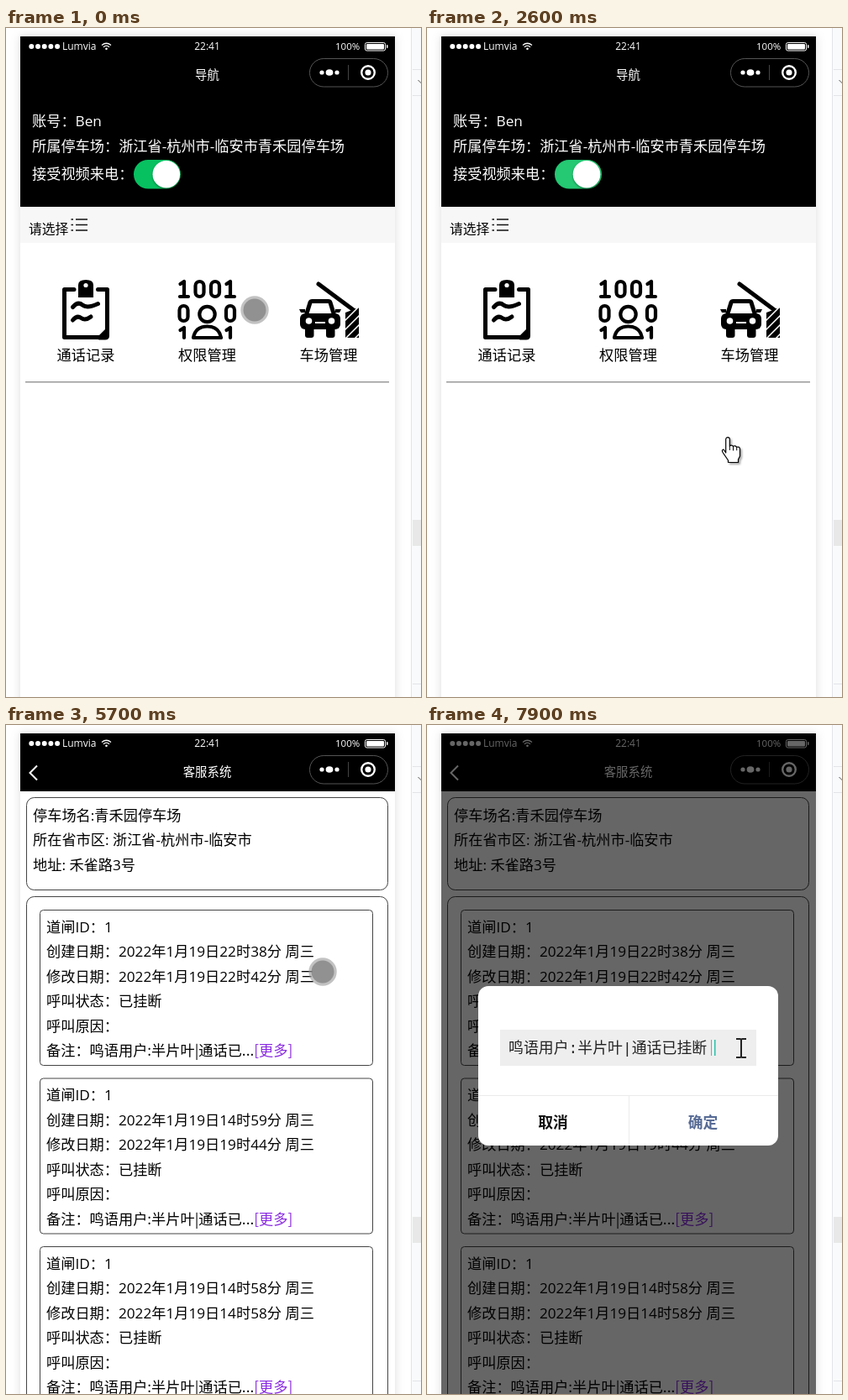
Animation, 494 px wide and 797 px high, one loop 8 s. Source, as an HTML page:

```html
<!DOCTYPE html>
<html lang="zh-CN">
<head>
<meta charset="utf-8">
<title>Parking service walkthrough</title>
<style>
html, body { margin: 0; width: 100%; height: 100%; overflow: hidden; background: #fff; }
svg { display: block; width: 494px; height: 797px; }
text { font-family: "Open Sans", "Noto Sans CJK SC", "Noto Sans CJK", sans-serif; font-size: 17.2px; white-space: pre; }
.cjk { font-family: "Noto Sans CJK SC", "Noto Sans CJK", sans-serif; }
.mono { font-family: "Liberation Mono", "Noto Sans CJK SC", "Noto Sans CJK", monospace; font-size: 17.9px; font-weight: 300; }
.mid { text-anchor: middle; }
.bold { font-weight: 700; }
.line { fill: none; stroke: #000; stroke-width: 5; stroke-linecap: round; stroke-linejoin: round; }
</style>
</head>
<body>
<svg id="stage" viewBox="0 0 494 797"></svg>
<script>
const LOOP = 8000, STEP = 100;
const USER = '鸣语用户:半片叶|通话已';
const GARAGE = '青禾园停车场';

// Text whose ideographs are centred on cy.
const text = (x, cy, str, size = 17.2, fill = '#000', cls = '') =>
  `<text x="${x}" y="${cy + size * 0.38}" style="font-size:${size}px" fill="${fill}" class="${cls}">${str}</text>`;
const rect = (x, y, w, h, fill, r = 0, extra = '') =>
  `<rect x="${x}" y="${y}" width="${w}" height="${h}" rx="${r}" fill="${fill}" ${extra}/>`;
const disc = (x, y, r, fill, extra = '') => `<circle cx="${x}" cy="${y}" r="${r}" fill="${fill}" ${extra}/>`;
const path = (d, extra = 'class="line"') => `<path d="${d}" ${extra}/>`;
const group = (id, body, extra = '') => `<g id="${id}" ${extra}>${body}</g>`;
const frame = (x, y, w, h, r) => rect(x + .5, y + .5, w, h, '#fff', r, 'stroke="#444"');

function sidePanel() {
  return rect(482, 0, 12, 797, '#f9fafb') +
    rect(482, 0, 1, 797, '#e3e4e8') +
    rect(484, 49, 10, 1, '#e3e4e8') + rect(484, 80, 10, 1, '#e3e4e8') +
    path('M490.5 62l4 4', 'stroke="#555" fill="none"') +
    rect(484, 586, 10, 31, '#e8e8e8') + rect(484, 781, 10, 1, '#e3e4e8');
}

function topBar() {
  let s = rect(17, 10, 446, 69, '#000');
  for (let i = 0; i < 5; i++) s += disc(30.3 + i * 7.7, 22, 3, '#fff');
  s += text(67, 21.5, 'Lumvia', 12, '#fff') +
    path('M114 20.5q5.5-4.5 11 0M116 22.7q3.5-3 7 0', 'fill="none" stroke="#fff" stroke-width="1.3"') +
    disc(119.5, 24.7, 1.3, '#fff') +
    text(239.5, 21, '22:41', 12, '#fff', 'mid') + text(392, 22, '100%', 11.5, '#fff') +
    rect(427.5, 17.5, 24, 9.5, 'none', 2, 'stroke="#fff"') + rect(429, 19, 21, 6.5, '#fff', 1) +
    rect(453, 20, 1.5, 4, '#fff', .7) +
    group('homeTitle', text(239.5, 55.5, '导航', 14.4, '#fff', 'mid')) +
    group('deskTitle', text(239.5, 55.5, '客服系统', 14.4, '#fff', 'mid') +
      path('M37 48.5l-8.5 8.5 8.5 8.5', 'fill="none" stroke="#fff" stroke-width="2"'));
  return s;
}

const capsule = () =>
  rect(361.5, 36.5, 93, 33.5, '#000', 16.7, 'stroke="#555"') +
  disc(376, 53, 2.6, '#fff') + `<ellipse cx="385" cy="53" rx="4.4" ry="3.8" fill="#fff"/>` + disc(394, 53, 2.6, '#fff') +
  rect(407, 44, 1, 18, '#444') +
  disc(431, 53, 7.8, 'none', 'stroke="#fff" stroke-width="2.4"') + disc(431, 53, 3.6, '#fff');

function clipboardIcon() {
  return path('M81 311.5H69.5V368.5H112L120.5 360V311.5H109.5') +
    path('M110 371.5h8q5 0 5-5v-10z', '') +
    path('M86 321V306q0-6 9-6t9 6V321z', '') + disc(95, 306.5, 2.6, '#fff') +
    path('M79.500 332.500q6-7 11.500-2.500t18.500-1.500') +
    path('M79.500 348q5-6 10-2.500t11.500-1.500');
}

function bitsIcon() {
  const thin = 'class="line" style="stroke-width:4.2"';
  const one = (x, y, h = 18) => path(`M${x - 4.5} ${y + 3}L${x} ${y}V${y + h}` + (h > 15 ? `M${x - 5} ${y + h}h10` : ''), thin);
  const zero = (x, y) => rect(x - 5, y, 10, 18, 'none', 5, thin);
  return one(212, 302) + zero(230.5, 302) + zero(249, 302) + one(267, 302) +
    zero(211.5, 331) + zero(267, 331) +
    disc(239.5, 341, 9.2, 'none', thin) +
    path('M223 369q2.500-13.500 16.500-13.500t16.500 13.500z', thin) +
    one(212, 357, 12) + one(267, 357, 12);
}

function carIcon() {
  let stripes = '';
  for (let i = 0; i < 4; i++) stripes += path(`M403 ${349 + i * 11}l18-18`, 'stroke="#fff" stroke-width="1.600"');
  return path('M372 305l43 32') +
    path('M404 339l16-6v36h-16z', '') + stripes +
    path('M358 340l4-13q.6-1.500 2.500-1.500h19q2 0 2.500 1.500l4 13') +
    path('M349 335h7v4h-5zM399 335h-7v4h5z', '') +
    rect(350, 340, 48, 19, '#000', 6) +
    rect(356, 354, 10.5, 15, '#000', 3) + rect(381, 354, 10.5, 15, '#000', 3) +
    disc(360.5, 349, 3.8, '#fff') + disc(387.5, 349, 3.8, '#fff') + rect(368, 350, 12, 2, '#fff');
}

function homePage() {
  const white = '#fff';
  return rect(17, 78, 446, 719, white) + rect(17, 78, 446, 135, '#000') +
    text(31, 110, '账号：Ben', 17.2, white) +
    text(31, 140, '所属停车场：浙江省-杭州市-临安市' + GARAGE, 17.2, white) +
    text(31, 173, '接受视频来电：', 17.2, white) +
    rect(152, 157, 56, 34.5, '#07c160', 17.2) +
    rect(152.5, 157.5, 55, 33.5, white, 16.7, 'id="off" stroke="#dfdfdf"') +
    disc(0, 174.3, 16.3, white, 'id="knob" style="filter:drop-shadow(0 1px 1px #0006)"') +
    rect(17, 213, 446, 43, '#f7f7f7') + text(27, 239, '请选择', 15.8) +
    path('M83 228h14M83 234.500h14M83 241h14M77.500 228h2.500M77.500 234.500h2.500M77.500 241h2.500', 'stroke="#111" stroke-width="1.700"') +
    clipboardIcon() + bitsIcon() + carIcon() +
    text(95, 389.5, '通话记录', 17.2, '#000', 'mid') +
    text(239.5, 389.5, '权限管理', 17.2, '#000', 'mid') +
    text(384, 389.5, '车场管理', 17.2, '#000', 'mid') +
    rect(23, 421, 433, 1.5, '#999');
}

function record(y, made, changed) {
  const lines = ['道闸ID：1', `创建日期：2022年1月19日${made} 周三`, `修改日期：2022年1月19日${changed} 周三`,
    '呼叫状态：已挂断', '呼叫原因：'];
  return frame(40, y, 396, 185, 4) +
    lines.map((l, i) => text(48, y + 20 + i * 29.5, l)).join('') +
    text(48, y + 167.5, `备注：${USER}...<tspan fill="#8a2be2">[更多]</tspan>`, 17.2, '#000', 'cjk');
}

function deskPage() {
  return rect(17, 79, 446, 718, '#fff') + frame(24, 86, 430, 110, 9) +
    text(32, 107, '停车场名:') + text(32, 136.5, '所在省市区:') + text(32, 166, '地址:') +
    group('records', rect(25, 99, 428, 80, '#fff') +
      text(32, 107, '停车场名:' + GARAGE) +
      text(32, 136.5, '所在省市区: 浙江省-杭州市-临安市') +
      text(32, 166, '地址: 禾雀路3号') +
      frame(24, 204, 430, 640, 9) +
      record(220, '22时38分', '22时42分') +
      record(420.5, '14时59分', '19时44分') +
      record(621, '14时58分', '14时58分'));
}

function toast() {
  let spokes = '';
  for (let i = 0; i < 12; i++)
    spokes += path('M0-8.500V-15', `stroke="#fff" stroke-width="2.600" stroke-linecap="round" opacity="${.25 + i * .06}" transform="rotate(${i * 30})"`);
  return rect(175, 290, 129.5, 129, '#4c4c4c', 5) +
    `<g transform="translate(239.500 342)">${group('spin', spokes)}</g>` +
    text(239.5, 384.5, '加载中~ ~ ~', 15, '#fff', 'mid');
}

function dialog(top, height, body) {
  const foot = top + height - 60;
  return rect(61, top, 357, height, '#fff', 12) + body +
    rect(61, foot, 357, 1, '#ebebeb') + rect(240, foot, 1, 60, '#ebebeb') +
    text(150, foot + 32, '取消', 17.8, '#111', 'mid bold') +
    text(328.5, foot + 32, '确定', 17.8, '#576b95', 'mid bold');
}

const askBody = text(239.5, 356, '结束', 17.8, '#000', 'mid bold') +
  text(239.5, 398, '是否结束本次客服？', 17.9, '#808080', 'mid');
const noteBody = rect(87, 363, 305, 43, '#eee') +
  text(97, 384.5, USER + '挂断', 17.9, '#222', 'mono') +
  rect(338, 375, 1, 19, '#999') + rect(342, 375, 1.5, 19, '#2bc0a8', 0, 'id="caret"');

const outlined = 'fill="#fff" stroke="#000" stroke-width="1.200" stroke-linejoin="round"';
const cursors =
  group('touch', disc(0, 0, 16.7, '#999', 'opacity=".6"') + disc(0, 0, 13.5, '#808080', 'opacity=".75"')) +
  group('arrow', path('M0 0V28L6.500 22 11.500 34 16.500 32 11.500 20.500H20z', outlined), 'style="filter:drop-shadow(2px 2px 1px #0005)"') +
  group('hand', path('M-2.300 18V2a2.300 2.300 0 0 1 4.600 0V10q2-2 4.200 .5 2.200-1.800 4.200 .8 3.300-1 3.800 2.200V22l-2 4v3.500H.5V27L-6 17.500q-1.500-3 1-3.500z', outlined) +
    path('M2.300 10v5M6.500 10.500v5M10.700 11.300v4', 'stroke="#000"'), 'style="filter:drop-shadow(2px 2px 1px #0005)"') +
  group('beam', path('M-6-11h4.500q1.500 0 1.500 1.500V9.500Q0 11-1.500 11H-6M6-11H1.500Q0-11 0-9.500M6 11H1.500Q0 11 0 9.500', 'fill="none" stroke="#222" stroke-width="2"'));

const stage = document.getElementById('stage');
stage.innerHTML =
  '<clipPath id="phone"><rect x="17" y="10" width="446" height="787"/></clipPath>' +
  rect(0, 0, 494, 797, '#fff') + sidePanel() +
  rect(17, 10, 446, 800, '#fff', 0, 'style="filter:drop-shadow(0 0 6px #0002)"') +
  `<g clip-path="url(#phone)">${group('home', homePage()) + group('desk', deskPage()) + topBar() + capsule() +
    rect(17, 10, 446, 787, '#000', 0, 'id="mask"') +
    group('ask', dialog(308, 196, askBody)) + group('note', dialog(311, 190, noteBody)) +
    group('toast', toast())}</g>` + cursors;

const el = {};
stage.querySelectorAll('[id]').forEach(n => el[n.id] = n);
const show = (node, on) => node.style.display = on ? '' : 'none';
const ramp = (t, a, b) => Math.min(1, Math.max(0, (t - a) / (b - a)));

// time, x, y, pointer kind
const moves = [
  [0, 296, 336, 'touch'], [600, 177, 176, 'touch'], [800, 177, 176, 'touch'], [900, 134, 174, 'touch'],
  [1000, 162, 173, 'touch'], [1200, 162, 172, 'arrow'], [1400, 162, 172, 'arrow'], [2000, 358, 488, 'arrow'],
  [2200, 358, 488, 'hand'], [2600, 358, 488, 'hand'], [2700, 345, 482, 'touch'], [3400, 129, 369, 'touch'],
  [4000, 115, 337, 'touch'], [4500, 115, 337, 'touch'], [5400, 382, 275, 'touch'], [5600, 382, 275, 'touch'],
  [5700, 377, 294, 'touch'], [6500, 322, 387, 'touch'], [6900, 322, 387, 'arrow'], [7100, 322, 387, 'arrow'],
  [7200, 326, 387, 'beam'], [7700, 355, 385, 'beam'], [7900, 374, 385, 'beam']
];

function pointer(t) {
  let i = moves.length - 1;
  while (moves[i][0] > t) i--;
  const a = moves[i], b = moves[i + 1] || a;
  const k = a === b ? 0 : ramp(t, a[0], b[0]);
  for (const kind of ['touch', 'arrow', 'hand', 'beam']) show(el[kind], kind === a[3]);
  el[a[3]].setAttribute('transform', `translate(${a[1] + (b[1] - a[1]) * k} ${a[2] + (b[2] - a[2]) * k})`);
}

function draw(t) {
  const ask = t < 2600 ? ramp(t, 1100, 1400) : 0;
  const note = ramp(t, 6900, 7200);
  el.mask.style.opacity = .6 * Math.max(ask, note);
  el.ask.style.opacity = ask;
  el.note.style.opacity = note;
  show(el.caret, t >= 7600);

  const off = ramp(t, 2560, 2900);
  el.off.style.opacity = off;
  el.knob.setAttribute('cx', 190.8 - 21 * off * off * (3 - 2 * off));

  show(el.homeTitle, t < 4400);
  show(el.deskTitle, t >= 4400);
  const slide = 1 - (1 - ramp(t, 4500, 4800)) ** 2;
  show(el.desk, slide > 0);
  el.desk.setAttribute('transform', `translate(${446 * (1 - slide)} 0)`);
  show(el.records, t >= 5200);
  show(el.toast, t >= 4300 && t < 5300);
  el.spin.setAttribute('transform', `rotate(${t / STEP * 30})`);
  pointer(t);
}

const start = performance.now();
function tick() {
  const t = (performance.now() - start) % LOOP;
  draw(Math.floor(t / STEP) * STEP);
  requestAnimationFrame(tick);
}
draw(0);
requestAnimationFrame(tick);
</script>
</body>
</html>
```
